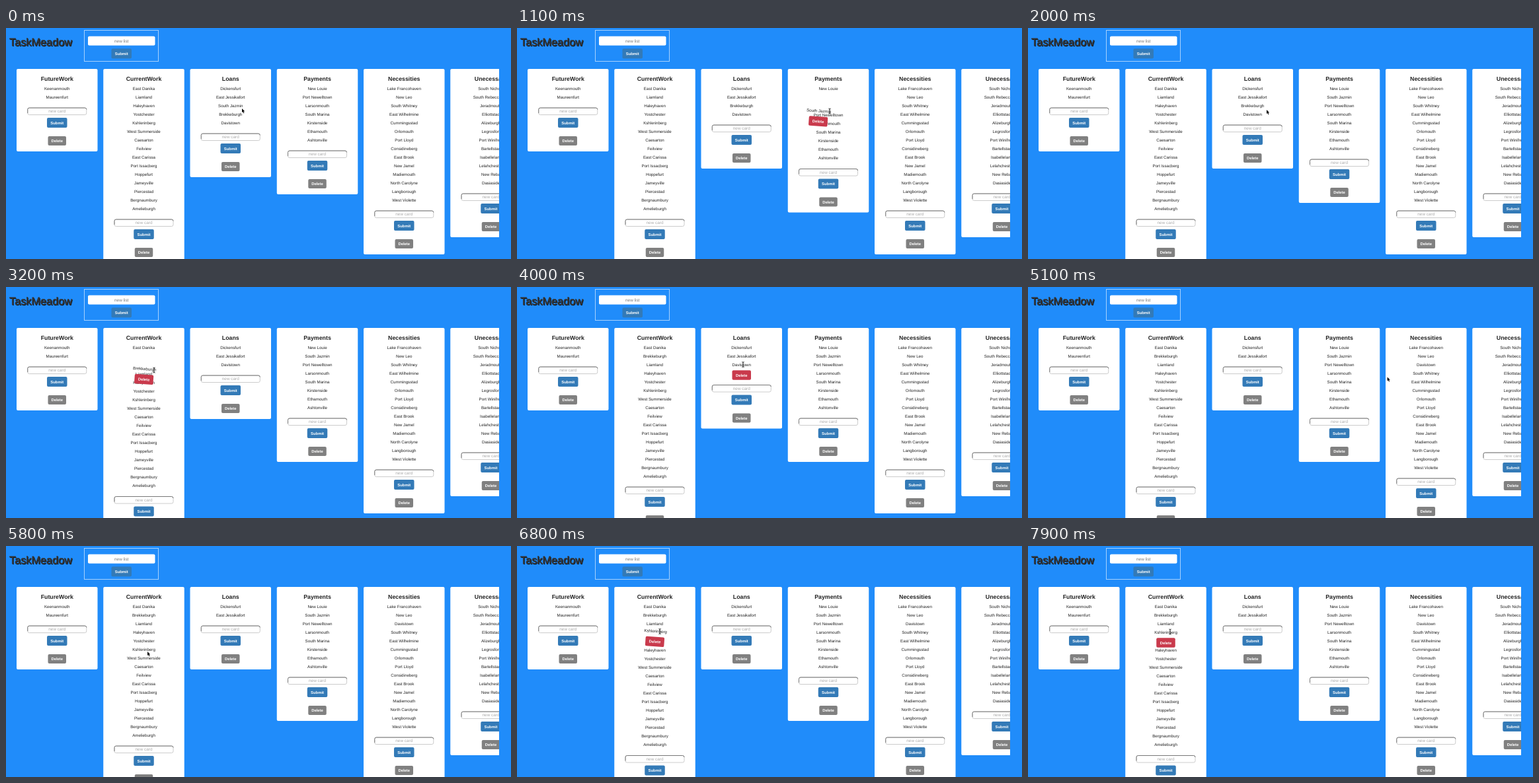
An HTML page with a canvas for the animation above (8000 ms loop, 764x350 px).

```html
<!DOCTYPE html>
<html lang="en">
<head>
<meta charset="utf-8">
<title>Card board</title>
<style>
html, body { margin: 0; height: 100%; overflow: hidden; background: #208cfa; }
canvas { display: block; }
</style>
</head>
<body>
<canvas id="stage" width="764" height="350"></canvas>
<script>
const ctx = document.getElementById('stage').getContext('2d');
const LOOP = 8000, STEP = 100;
const ROW = 13, OPEN_ROW = 27.5, FIRST_ROW = 91.5;
const TILT = 4 * Math.PI / 180;

const board = [
  ['FutureWork', 'Keenanmouth,Maureenfurt'],
  ['CurrentWork', 'East Danika,Liamland,Haleyhaven,Yostchester,Kshlerinberg,West Summerside,Caesarton,Feilview,East Carissa,Port Issacberg,Hoppefurt,Jameyville,Piercestad,Bergnaumbury,Amelieburgh'],
  ['Loans', 'Dickensfurt,East Jessikafort,South Jazmin,Brekkeburgh,Davistown'],
  ['Payments', 'New Louie,Port Newelltown,Larsonmouth,South Marina,Kirstenside,Ethamouth,Ashtonville'],
  ['Necessities', 'Lake Francohaven,New Leo,South Whitney,East Wilhelmine,Cummingsstad,Orlomouth,Port Lloyd,Considineberg,East Brook,New Jamel,Madiemouth,North Carolyne,Langborough,West Violette'],
  ['Unecessary', 'South Nichole,South Rebeccaside,Jeradmouth,Elliottstad,Alizeburgh,Legrosfort,Port Winifred,Bartellstad,Isabelleland,Lelahchester,New Reba,Dasiaside'],
];

// from/to are [column, row]; the rest are times in ms
const moves = [
  { from: [2, 2], to: [3, 1], hover: 200, grab: 500, drop: 1300, land: 1500, leave: 1700 },
  { from: [2, 2], to: [1, 1], hover: 2200, grab: 2500, drop: 3300, land: 3500, leave: 3600 },
  { from: [2, 2], to: [4, 2], hover: 4000, grab: 4100, drop: 4600, land: 4800, leave: 5000 },
  { from: [1, 5], to: [1, 3], hover: 5900, grab: 6100, drop: 7800, land: 7900, leave: Infinity },
];

// pointer path: time, x, y
const path = [
  [0, 357, 122], [200, 356, 118], [700, 356, 118], [1100, 473, 126],
  [1600, 473, 126], [2000, 361, 124], [2200, 354, 119.5], [2600, 354, 119.5],
  [3200, 224, 126], [3500, 224, 126], [3600, 250, 113], [3800, 340, 115],
  [3900, 340, 115], [4000, 342, 117.5], [4100, 342, 117.5], [4400, 570, 134.5],
  [5000, 570, 134.5], [5600, 214, 160], [5800, 214, 160], [5900, 215, 157],
  [6200, 215, 157], [6700, 216, 118], [7200, 217, 228], [7500, 216, 201],
  [7600, 216, 201], [7800, 215, 130], [8000, 215, 130],
];

const mix = (a, b, k) => a + (b - a) * k;
const centerX = col => 77.25 + 131.25 * col;
const rowY = row => FIRST_ROW + ROW * row;

function pointerAt(t) {
  const i = path.findIndex(p => p[0] > t);
  const [t0, x0, y0] = path[i - 1], [t1, x1, y1] = path[i];
  const u = (t - t0) / (t1 - t0), k = u * u * (3 - 2 * u);
  return { x: mix(x0, x1, k), y: mix(y0, y1, k) };
}

function stateAt(t) {
  const pointer = pointerAt(t);
  const lists = board.map(([, cards]) => cards.split(','));
  const state = { lists, pointer, open: null, held: null, beam: false };
  for (const m of moves) {
    if (t < m.hover) break;
    state.beam = t < m.leave;
    const [col, row] = m.from, [toCol, toRow] = m.to;
    const name = lists[col][row];
    if (t < m.grab) { state.open = name; break; }
    lists[col].splice(row, 1);
    if (t < m.land) {
      const start = pointerAt(m.grab);
      let x = centerX(col) + pointer.x - start.x;
      let y = rowY(row) + pointer.y - start.y;
      let gapCol = toCol, gapRow = toRow, settle = 0;
      if (t < m.drop) {
        gapCol = Math.floor((x - 11.6) / 131.25);
        gapRow = gapCol === col ? row + Math.round((y - rowY(row)) / ROW) : Math.round((y - 111) / ROW);
      } else {
        settle = (t - m.drop) / (m.land - m.drop);
        x = mix(x, centerX(toCol), settle);
        y = mix(y, rowY(toRow), settle);
      }
      lists[gapCol].splice(Math.max(0, gapRow), 0, null);
      state.held = { name, x, y, tilt: TILT * (1 - settle) };
      break;
    }
    lists[toCol].splice(toRow, 0, name);
    if (t < m.leave) state.open = name;
  }
  return state;
}

function text(str, x, y, size, color, weight = 'normal') {
  ctx.font = `${weight} ${size}px "Liberation Sans", Arial, sans-serif`;
  ctx.fillStyle = color;
  ctx.fillText(str, x, y + size * 0.35);
}

function box(x, y, w, h, r, color) {
  ctx.fillStyle = color;
  ctx.beginPath();
  ctx.roundRect(x, y, w, h, r);
  ctx.fill();
}

function button(label, x, y, w, h, color) {
  box(x - w / 2, y - h / 2, w, h, 2, color);
  text(label, x, y, 5.9, '#fff', 'bold');
}
const submitButton = (x, y) => button('Submit', x, y, 30.5, 15, '#337ab7');
const redButton = (x, y) => button('Delete', x, y, 28.5, 14.5, '#c93a4c');

function cardField(x, y) {
  const left = x - 44.5, top = y - 5;
  ctx.lineWidth = 1;
  ctx.strokeStyle = '#ccc';
  ctx.beginPath();
  ctx.roundRect(left, top, 89, 10.5, 2.5);
  ctx.stroke();
  ctx.strokeStyle = '#777';
  ctx.beginPath();
  ctx.moveTo(left, y + 3);
  ctx.arcTo(left, top, x, top, 2.5);
  ctx.arcTo(left + 89, top, left + 89, y, 2.5);
  ctx.stroke();
  text('new card', x, y, 6.4, '#aaa');
}

function drawList(title, cards, col, open) {
  const x = centerX(col);
  const heights = cards.map(c => c === null || c === open ? OPEN_ROW : ROW);
  const end = FIRST_ROW - ROW + heights.reduce((a, b) => a + b, 0);
  box(x - 61.25, 62, 122.5, end + 82.5 - 62, 2, '#fff');
  text(title, x, 77, 8.8, '#222', 'bold');
  let y = FIRST_ROW;
  cards.forEach((card, i) => {
    if (card) text(card, x, y, 6.2, '#222');
    if (card && card === open) redButton(x, y + 16);
    y += heights[i];
  });
  cardField(x, end + 21.5);
  submitButton(x, end + 39);
  button('Delete', x, end + 66.5, 27.5, 14, '#808080');
}

function drawHeader() {
  ctx.textAlign = 'left';
  text('TaskMeadow', 6, 22, 16.3, '#111');
  text('TaskMeadow', 5, 21, 16.3, '#333');
  ctx.strokeStyle = '#333';
  ctx.lineWidth = 0.5;
  ctx.strokeText('TaskMeadow', 5, 21 + 16.3 * 0.35);
  ctx.textAlign = 'center';
  ctx.strokeStyle = 'rgba(255,255,255,.6)';
  ctx.lineWidth = 1;
  ctx.strokeRect(118.5, 3.5, 112, 47);
  box(124, 12.5, 101.5, 14, 2, '#fff');
  text('new list', 174.7, 19.5, 6.4, '#777');
  submitButton(174.7, 38.7);
}

function drawPointer({ x, y }, beam) {
  ctx.save();
  ctx.translate(x, y);
  ctx.beginPath();
  if (beam) {
    ctx.lineWidth = 0.9;
    ctx.strokeStyle = '#111';
    for (const s of [-1, 1]) {
      ctx.moveTo(-1.6, 4 * s);
      ctx.quadraticCurveTo(0, 4 * s, 0, 2.8 * s);
      ctx.quadraticCurveTo(0, 4 * s, 1.6, 4 * s);
    }
    ctx.moveTo(0, -3);
    ctx.lineTo(0, 3);
    ctx.stroke();
  } else {
    const outline = [[0, 0], [0, 6], [1.4, 4.8], [2.4, 7.2], [3.4, 6.7], [2.4, 4.4], [4.2, 4.3]];
    outline.forEach(p => ctx.lineTo(...p));
    ctx.closePath();
    ctx.lineWidth = 1;
    ctx.strokeStyle = '#fff';
    ctx.stroke();
    ctx.fillStyle = '#000';
    ctx.fill();
  }
  ctx.restore();
}

function draw(t) {
  const { lists, pointer, open, held, beam } = stateAt(t);
  ctx.fillStyle = '#208cfa';
  ctx.fillRect(0, 0, 764, 350);
  drawHeader();
  ctx.save();
  ctx.beginPath();
  ctx.rect(0, 0, 746, 350);
  ctx.clip();
  lists.forEach((cards, col) => drawList(board[col][0], cards, col, open));
  ctx.restore();
  if (held) {
    ctx.save();
    ctx.translate(held.x, held.y);
    ctx.rotate(held.tilt);
    text(held.name, 0, 0, 6.2, '#222');
    redButton(0, 16);
    ctx.restore();
  }
  drawPointer(pointer, beam);
}

ctx.textRendering = 'geometricPrecision';
const startTime = performance.now();
function tick() {
  const t = (performance.now() - startTime) % LOOP;
  draw(Math.floor(t / STEP) * STEP);
  requestAnimationFrame(tick);
}
tick();
</script>
</body>
</html>
```
